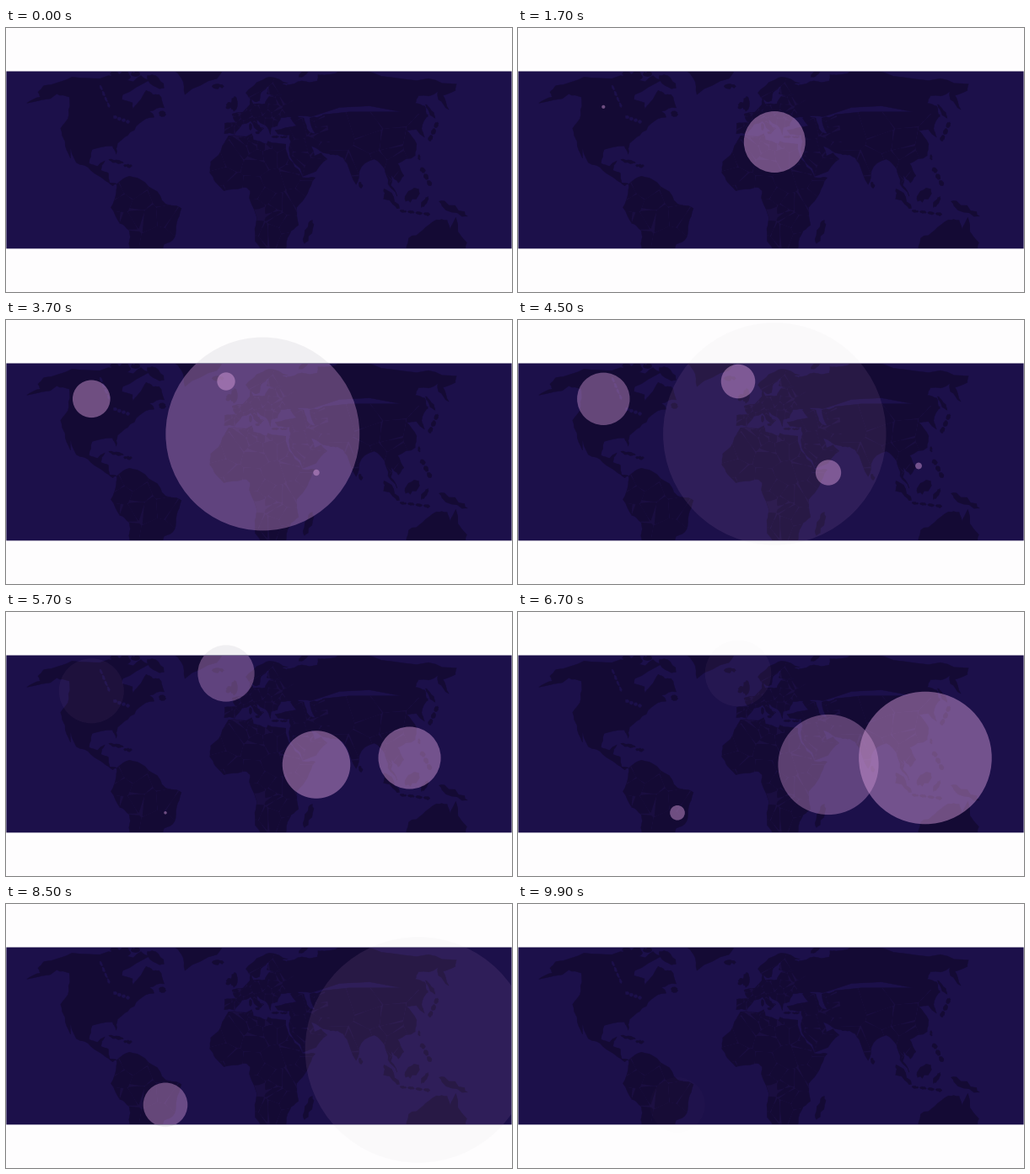
A matplotlib script that plays this animation: 600x314 px, repeating every 10 s.

```python
import math

import matplotlib.pyplot as plt
import numpy as np
from matplotlib.animation import FuncAnimation
from matplotlib.patches import Circle, Polygon, Rectangle

W, H = 600, 314
STEP, FRAMES = 100, 100
TOP, BOTTOM = 51.5, 262.4
PAPER, OCEAN, LAND, BORDER = "#fefdfe", "#1c104a", "#140a34", "#1a0e40"

rng = np.random.default_rng(4)
plt.rcParams["toolbar"] = "None"
fig = plt.figure(figsize=(W / 100, H / 100), dpi=100, facecolor=PAPER)
ax = fig.add_axes([0, 0, 1, 1])
ax.set(xlim=(0, W), ylim=(H, 0))
ax.axis("off")

# The sea has soft edges; everything on it stays inside whole pixels.
ax.add_patch(Rectangle((0.4, TOP), W - 0.8, BOTTOM - TOP, fc=OCEAN, lw=0,
                       snap=False, zorder=2))
window = Rectangle((1, 52), W - 2, 210, fc="none", lw=0)
ax.add_patch(window)


def project(coords):
    """Robinson-like projection of a flat lon, lat list to stage pixels."""
    lon, lat = np.radians(np.reshape(coords, (-1, 2)).astype(float)).T
    x = (lon - math.radians(11)) * (1 - 0.1454 * lat**2 - 0.0321 * lat**4)
    y = 0.71 * lat - 0.008 * lat**5
    return np.column_stack([293.2 + 105.2 * x, 203 - 168.9 * y])


def roughen(points, rounds=2, amount=0.06):
    """Turn a coarse outline into a coast by shifting edge midpoints."""
    for _ in range(rounds):
        edge = np.roll(points, -1, axis=0) - points
        normal = edge[:, ::-1] * [1, -1]
        shift = rng.normal(0, amount, (len(points), 1))
        middle = points + edge / 2 + normal * shift
        points = np.stack([points, middle], axis=1).reshape(-1, 2)
    return points


def patch(points, color=LAND, z=3):
    shape = Polygon(points, fc=color, ec=color, lw=0.3, zorder=z)
    ax.add_patch(shape)
    shape.set_clip_path(window)
    return shape


def divide(shape, count):
    """Draw the borders between the nearest-site cells of a land mass."""
    low = np.maximum(shape.get_xy().min(axis=0), [1, 52])
    high = np.minimum(shape.get_xy().max(axis=0), [W - 1, 262])
    x, y = np.meshgrid(np.arange(low[0], high[0]), np.arange(low[1], high[1]))
    sites = rng.uniform(low, high, (count, 2))
    gaps = np.sort([np.hypot(x - sx, y - sy) for sx, sy in sites], axis=0)
    lines = ax.contourf(x, y, gaps[1] - gaps[0], levels=[-1, 0.7],
                        colors=[BORDER], antialiased=True, zorder=5)
    lines.set_clip_path(shape)


def land(*coords, states=0):
    shape = patch(roughen(project(coords)))
    if states:
        divide(shape, states)


def chain(lon0, lat0, lon1, lat1, width, count=1, color=LAND):
    """A row of long islands (or lakes) between two places."""
    start, end = project([lon0, lat0, lon1, lat1])
    along = (end - start) / count
    across = along[::-1] * [-1, 1] / np.hypot(*along) * width / 2
    turn = np.linspace(0, 2 * np.pi, 8, endpoint=False)[:, None]
    reach = 0.5 if count == 1 else 0.42
    for i in range(count):
        ring = (start + along * (i + 0.5)
                + along * reach * np.cos(turn) + across * np.sin(turn))
        patch(roughen(ring, 1, 0.15), color, 3 if color == LAND else 4)


# North America
land(-168, 65.6, -156, 71, -128, 70, -95, 68, -94, 72, -82, 69, -94, 60,
     -92, 57, -82, 55, -79, 51.3, -77, 57, -77.5, 62.5, -70, 60, -65, 60,
     -56, 52, -66, 50, -61, 46.5, -70, 43, -75.6, 36, -81, 31.5, -80.3, 25.3,
     -84, 30, -97, 28, -97, 20, -91, 18.5, -87, 21.5, -88.5, 16, -83.5, 14.5,
     -82, 9, -77.5, 8.5, -80, 7.3, -86, 11, -95, 16, -105.5, 20.5, -113, 31,
     -110, 23, -117, 32.6, -124, 40, -124, 48, -135, 58.5, -148, 60.5,
     -163, 54.8, -158, 58.5, -165, 61.5)
land(-70, 77, -54, 70, -44, 60, -22, 70, -20, 78)
chain(-88, 72, -64, 64, 11)
chain(-118, 71, -102, 71, 9)
chain(-126, 73, -96, 73, 6, 3)
chain(-58.5, 49, -53, 48, 7)
chain(-84.5, 22.3, -74.5, 20.3, 3)
chain(-74, 18.8, -68.5, 18.6, 4)
chain(-91, 47, -77, 43.5, 4, 4, OCEAN)
chain(-121, 66, -97, 52, 2.5, 4, OCEAN)

# South America
land(-77.5, 8, -72, 12, -62, 10.7, -51, 4, -48, -1, -35.5, -5.5, -39, -14,
     -41, -22, -48.6, -26, -52, -33, -71.5, -33, -70.3, -18, -76, -14, -81, -5,
     -77.5, 4, states=16)

# Africa
land(-6, 35.8, 10, 37, 11, 33.5, 20, 31, 21, 32.7, 33, 31, 37, 20.5, 43, 12,
     51.2, 11.9, 46, 3, 39, -5, 40.5, -15, 35, -20, 32, -30, 17, -30, 12, -17,
     13.5, -11, 9, -1, 9, 4.5, 4, 6.3, -8, 4.5, -13.5, 9.5, -17.3, 14.7,
     -17, 21, -9.8, 30, states=55)
chain(49.5, -12.2, 45, -25.5, 9)

# Europe
land(-9.3, 43, -1.5, 43.5, -4.5, 48.4, 8.5, 54, 9, 57.5, 11, 54.2, 20, 54.5,
     24, 59, 30, 60, 41, 60, 41, 47, 31, 46.3, 28, 41.5, 23.5, 40.5,
     22.8, 36.5, 19.5, 42, 13, 45.5, 14, 42.4, 18.4, 40, 15.8, 38, 9, 44.4,
     3, 42.5, -2, 36.8, -9, 37, states=35)
land(30, 59.8, 22, 60.5, 25, 65.3, 17.5, 61.5, 16, 56.5, 13, 55.5, 8, 58,
     5, 61, 14, 67.5, 26, 71, 41, 67, 34, 66.5, 41, 64, 41, 59.8, states=4)
chain(-3.5, 50, -4, 58.8, 8)
chain(-8.5, 51.5, -7, 55.3, 6)
chain(-24, 65, -14, 65, 6)
chain(9, 43, 9, 39, 3)
chain(12.5, 37.7, 15.5, 37.5, 3)
chain(23, 35.2, 35, 35.2, 1.8, 2)

# Asia
land(26.2, 39, 41.5, 41.5, 38, 46, 41, 48, 47.5, 46, 50, 38, 54, 37, 52, 46,
     63, 48, 63, 25.2, 56, 27, 50, 30, 51.5, 24.2, 56.3, 26, 59.8, 22.5,
     52, 15.6, 43.3, 12.8, 35, 28.5, 36, 36.5, 28, 36.8, states=20)
land(40, 47, 40, 66, 54, 68.5, 68, 68.5, 72, 72.5, 80, 72.5, 104, 77.5,
     130, 71.5, 170, 70, 187, 66.5, 178, 62.5, 163, 59.5, 157, 51, 156, 57,
     163, 62, 143, 59.2, 135.5, 54.7, 141, 53, 138, 46.8, 53, 46.8)
land(62, 48, 139, 48, 129, 40, 128.5, 35, 125, 39.5, 118, 39, 121.5, 31,
     118.5, 24.5, 106, 20, 109, 13, 105, 9, 100.8, 13.4, 100, 7.5, 103.8, 1.4,
     98.3, 8.5, 97, 16.8, 91, 22.5, 80.2, 15.5, 77.6, 8.1, 72.8, 20, 67, 25,
     62, 25.2, states=22)
chain(53, 71, 66, 76, 5)
chain(142.5, 54, 142.5, 46, 3)
chain(130.5, 32.5, 143, 44, 5, 3)
chain(121, 25, 121, 22, 2.5)
chain(121, 18, 126, 7, 5, 3)
chain(80, 9.5, 81, 6, 4)
chain(95.5, 5.5, 105.5, -5.5, 6)
chain(109.5, -1.5, 118, 5.5, 13)
chain(105.5, -6.8, 126, -9, 3, 4)
chain(119.8, -5, 124, 1.2, 5)
chain(131, -1.5, 150, -10, 9)

# Australia
land(113.7, -22.5, 122, -18, 130, -12, 137, -12.2, 140, -17.5, 142.5, -10.7,
     153, -25, 153, -32, 115.5, -32)

GROW, FADE_FROM, FADE_TO, LEAD = 5000, 3100, 5200, 40
PULSE, SHADE, OPACITY = "#dfa3e0", "#d9d6dc", 0.45


def ease(x):
    return (1 - math.cos(math.pi * min(max(x, 0), 1))) / 2


class Ripple:
    """Disc that swells, then fades; dull on paper and bright on the map."""

    def __init__(self, x, y, radius, drift=0):
        self.x, self.y, self.radius, self.drift = x, y, radius, drift
        self.discs = [Circle((x, y), 0, fc=color, lw=0, zorder=z)
                      for color, z in ((SHADE, 1), (PULSE, 7))]
        for disc in self.discs:
            ax.add_patch(disc)
        self.discs[1].set_clip_path(window)

    def update(self, age):
        r = self.radius * ease(age / GROW)
        fade = 1 - ease((age - FADE_FROM) / (FADE_TO - FADE_FROM))
        for disc in self.discs:
            disc.set_visible(0 < age < GROW)
            disc.set_radius(r)
            disc.center = self.x + self.drift * r, self.y
            disc.set_alpha(OPACITY * fade)


# One ripple starts every second.
ripples = [
    Ripple(304.3, 135.5, 135),
    Ripple(101.3, 93.8, 38.8),
    Ripple(261, 73, 39.5),
    Ripple(368, 181.5, 70),
    Ripple(474.6, 173.5, 137, drift=0.106),
    Ripple(189, 238.8, 32.7),
]


def draw(i):
    for n, ripple in enumerate(ripples):
        ripple.update(i * STEP - 1000 * n + LEAD)
    return [disc for ripple in ripples for disc in ripple.discs]


anim = FuncAnimation(fig, draw, frames=FRAMES, interval=STEP, repeat=True,
                     repeat_delay=0, blit=False)
plt.show()
```
